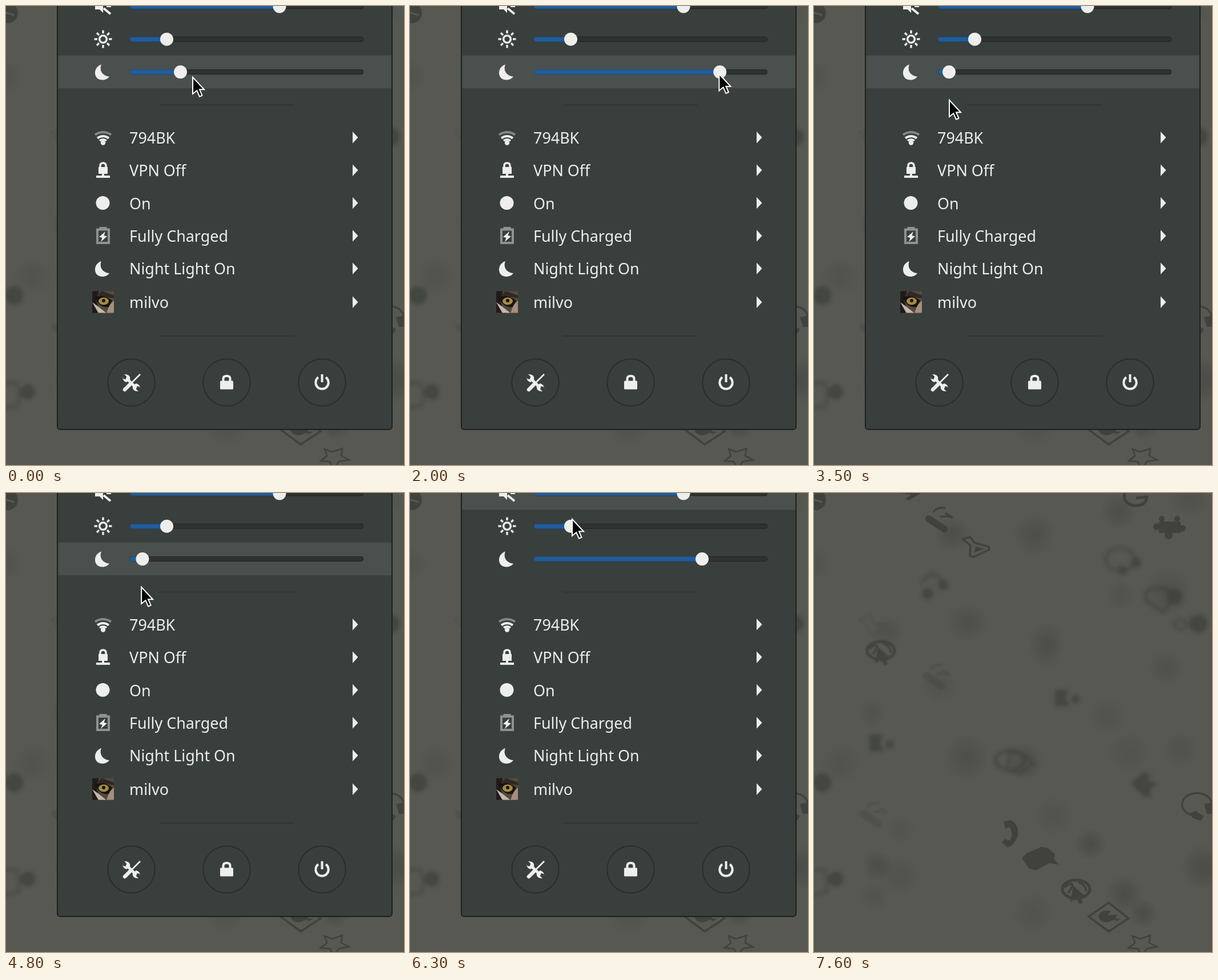
Write an HTML page that moves like this. It is 697x804 px and loops after 8.2 s.

```html
<!DOCTYPE html>
<html lang="en">
<head>
<meta charset="utf-8">
<title>System menu</title>
<style>
  html, body { margin: 0; width: 100%; height: 100%; overflow: hidden; background: #575851; }
  svg { display: block; width: 100%; height: 100%; }
  text { font: 26.9px "Noto Sans", "Open Sans", sans-serif; fill: #eeeeec; }
  .line { fill: none; stroke: #eeeeec; }
  .ink { fill: #3e3f3a; }
  .ring { fill: none; stroke: #3e3f3a; stroke-width: 5; }
  .thin { stroke-width: 3.5; }
</style>
</head>
<body>
<svg viewBox="0 0 697 804" preserveAspectRatio="none">
  <defs>
    <radialGradient id="soft">
      <stop offset="0" stop-color="#353634"/>
      <stop offset=".45" stop-color="#353634" stop-opacity=".65"/>
      <stop offset="1" stop-color="#353634" stop-opacity="0"/>
    </radialGradient>
    <filter id="b1" x="-30%" y="-30%" width="160%" height="160%"><feGaussianBlur stdDeviation="1.2"/></filter>
    <filter id="b3" x="-50%" y="-50%" width="200%" height="200%"><feGaussianBlur stdDeviation="3.2"/></filter>
    <clipPath id="avatar"><rect x="151" y="499.500" width="38" height="38"/></clipPath>
    <path id="moon" d="M167 102.500C152 107 152 129.500 169 129.500C174.500 129.500 178.500 127 181 123.500C170 123 162.500 113.500 167 102.500Z"/>
    <g id="brush">
      <path d="M-17-2L10 16" stroke="#3e3f3a" stroke-width="12" stroke-linecap="round"/>
      <path class="ring thin" d="M-9-13Q-4-23 12-21M3-5Q12-8 25-4L12-12"/>
    </g>
    <g id="globe">
      <ellipse class="ring" rx="24" ry="16"/>
      <path class="ring thin" d="M-20-3Q-8-14-6-6L-14 7M4-12Q16-10 18 4"/>
      <path class="ink" d="M-5-6L16 12L7 13L12 24L6 26L1 16L-10 22Z"/>
    </g>
    <g id="camera">
      <path class="ink" d="M-13-14H11L5 0L13 14H-13Z"/>
      <circle class="ink" cx="23" cy="2" r="7"/>
    </g>
  </defs>

  <rect width="697" height="804" fill="#575851"/>
  <g id="blobs" fill="url(#soft)"></g>

  <g filter="url(#b3)" opacity=".72">
    <ellipse class="ring" cx="536" cy="116" rx="25" ry="20" opacity=".7"/>
    <circle class="ink" cx="564" cy="122" r="9"/><circle class="ink" cx="540" cy="135" r="8"/>
    <path class="ring" d="M187 156L207 140L229 156" opacity=".7"/>
    <circle class="ink" cx="226" cy="161" r="9"/><circle class="ink" cx="199" cy="176" r="10"/>
    <path class="ring" d="M611 207Q574 190 581 174Q596 160 622 171Q627 200 611 207Z" opacity=".8"/>
    <circle class="ink" cx="631" cy="182" r="14"/>
    <ellipse class="ring" cx="642" cy="230" rx="11" ry="8" opacity=".7"/>
    <circle class="ink" cx="673" cy="229" r="16"/>
    <use href="#camera" x="435" y="359"/>
    <use href="#camera" x="110" y="438"/>
    <ellipse class="ring" cx="343" cy="468" rx="25" ry="17"/>
    <path class="ring" d="M343 454L368 458L384 474L362 490L338 486Z" opacity=".7"/>
    <path class="ink" d="M555 508L578 488L590 494L583 503L601 509L589 518L590 530L578 533Z"/>
    <circle class="ink" cx="14" cy="507" r="16"/><circle class="ink" cx="38" cy="676" r="13"/>
    <path class="ring" d="M-8 660H18Q28 682 20 700L-4 704" opacity=".6"/>
  </g>

  <g filter="url(#b1)">
    <use href="#globe" x="117" y="276" opacity=".8"/>
    <use href="#brush" x="103" y="564" opacity=".25"/>
    <use href="#brush" x="213" y="322" opacity=".25"/>
    <path class="ring" d="M82 222L97 212L106 230L124 232L105 250Z" opacity=".15"/>
  </g>
  <g opacity=".85">
    <circle class="ink" cx="3" cy="12" r="18"/>
    <path d="M-2 11L15 16" stroke="#575851" stroke-width="3"/>
    <path class="ink" d="M150 0H188L166 13L160 10L171 3Z"/>
    <path class="ring" d="M544 0Q540 18 560 22Q582 23 583 7L564 9"/>
    <use href="#brush" transform="translate(218 47)"/>
    <path class="ring thin" d="M261 81L273 77L281 87L306 94L307 99L280 112L273 110L274 92Z"/>
    <path class="ink" d="M281 104L283 94L298 98Z"/>
    <path class="ink" d="M604 50H642V70H604Z"/>
    <g class="ink"><circle cx="609" cy="45" r="5"/><circle cx="636" cy="45" r="5"/><circle cx="600" cy="59" r="6"/><circle cx="645" cy="62" r="6"/><circle cx="621" cy="74" r="7"/></g>
    <path class="ring thin" d="M664 565A26 20 0 1 1 693 556"/>
    <path class="ink" d="M683 545L697 542V562H688ZM657 562L668 557L683 566L678 574L664 570Z"/>
    <path class="ink" d="M332 576L343 573Q359 579 357 598Q354 614 339 621L329 612L334 606L343 609Q350 596 342 585L335 588Z"/>
    <path class="ink" d="M364 640L372 631L398 620L410 622L422 633L420 640L428 651L412 648L389 661L377 658Z"/>
    <use href="#globe" x="459" y="694"/>
    <path class="ring thin" d="M481 742L516 717.500L551 745L516 768Z"/>
    <path class="ink" d="M498 742Q500 729 520 732L514 740L531 738Q528 750 512 752Q500 751 498 742ZM520 744L538 746L530 750Z"/>
    <path class="ring" style="stroke-width:2.600" d="M558 776L571 781L589 775L587 788L601 795L583 798L574 810L567 798L551 797L562 788Z"/>
  </g>

  <g id="menu">
    <rect x="90" y="-40" width="586" height="781.800" rx="5" fill="#393f3d" stroke="#1d2020" stroke-width="2"/>
    <rect id="hover" x="91" width="584" height="57.400" fill="#4a504e"/>
    <g id="sliders"></g>
    <path d="M268 173.500H504M268 578H504" stroke="#313635" stroke-width="2"/>
    <g id="rows"></g>

    <g fill="#eeeeec">
      <path d="M156-6H164L170-12V12L164 6H156Z"/>
      <path class="line" stroke-width="4" d="M171 4L183 14M176 0H184"/>
      <circle class="line" cx="170" cy="58" r="6.300" stroke-width="3.600"/>
      <g id="rays" class="line" stroke-width="3.400"></g>
      <use href="#moon"/>
      <use href="#moon" y="344.500"/>

      <path class="line" stroke-width="4" d="M156 225.500Q170 216.500 184 225.500" opacity=".42"/>
      <path class="line" stroke-width="4" d="M160 231.500Q170 224.500 180 231.500"/>
      <path class="line" stroke-width="3.500" d="M164 236Q170 231.500 176 236"/>
      <circle cx="170" cy="239.500" r="4.200"/>

      <path class="line" stroke-width="3.500" d="M165 284V280Q165 275 170 275T175 280V284"/>
      <path d="M162 282H178V294H172V297H182V301H158V297H168V294H162Z"/>
      <circle cx="169.500" cy="345" r="12"/>

      <path d="M160 391.500H180V415H160Z" fill="none" stroke="#8f9291" stroke-width="4"/>
      <path d="M163.500 387H176.500V392H163.500Z" fill="#8f9291"/>
      <path d="M174 395L163 404.500L168.500 406L166 413L177 403.500L171.500 402Z"/>

      <g clip-path="url(#avatar)">
        <rect x="151" y="499" width="39" height="39" fill="#55493f"/>
        <path d="M151 499H163L158 516L166 538H151Z" fill="#201b19"/>
        <path d="M167 499L189 507V512L160 507Z" fill="#302923"/>
        <path d="M151 519L161 526L176 538H162Z" fill="#c4b7a8"/>
        <path d="M181 524L190 515V538H176Z" fill="#a58f7d"/>
        <path d="M155 510Q171 504 186 516L180 527Q164 530 155 510Z" fill="#181411"/>
        <ellipse cx="171" cy="517" rx="9" ry="6.500" fill="#a58a43"/>
        <circle cx="171" cy="516" r="3" fill="#17130c"/>
      </g>

      <g class="line">
        <path stroke-width="5" d="M211 652L228 669"/>
        <path stroke-width="2.600" d="M235 645L219 661"/>
        <path stroke-width="6.500" stroke-linecap="round" d="M217 663L208 672"/>
      </g>
      <path id="jaw" d="M207 645L211 649L210 654L205 653L204 649Q204 657 211 659L217 655Q219 645 207 645Z"/>
      <use href="#jaw" transform="rotate(180 219.500 660)"/>

      <rect x="375" y="656.500" width="23" height="15" rx="1.500"/>
      <path class="line" stroke-width="4" d="M380.500 658V653Q380.500 648 386.500 648T392.500 653V658"/>
      <path class="line" stroke-width="4" d="M547 650.500A11.200 11.200 0 1 0 560 650.500M553.500 645V659"/>
    </g>
    <g id="buttons" fill="none" stroke="#292e2c" stroke-width="2"></g>
  </g>

  <g id="cursor">
    <path d="M1 2.800V32L8.300 26L13 36.700L17.500 34.700L13 24.300H21Z" fill="#050505" stroke="#fff" stroke-width="2"/>
  </g>
</svg>

<script>
  const LOOP = 8200, STEP = 100, PITCH = 57.4;
  const LEAD = 35;                            // the knob runs ahead of the drawn pointer
  const GRAB = 200, DROP = 5600;
  const $ = id => document.getElementById(id);
  const clamp = (v, lo, hi) => Math.min(hi, Math.max(lo, v));
  const repeat = (n, draw) => Array.from({ length: n }, (_, i) => draw(i)).join("");

  let seed = 7;
  const random = () => (seed = seed * 16807 % 2147483647) / 2147483647;

  // faint smudges on a loose 5 x 6 grid
  $("blobs").innerHTML = repeat(30, i => {
    const x = (i % 5 + random()) * 140, y = (Math.floor(i / 5) + random()) * 134;
    return `<circle cx="${x}" cy="${y}" r="${26 + random() * 18}" opacity="${.1 + random() * .25}"/>`;
  });

  const slider = (row, x, id) => {
    const y = .8 + row * PITCH;
    return `<rect x="217.500" y="${y - 4}" width="408" height="8" rx="3" fill="#2e3332" stroke="#1e2221"/>
      <rect id="${id}Fill" x="217.500" y="${y - 4}" width="${x - 217}" height="8" rx="3" fill="#215d9c" stroke="#1d5087"/>
      <circle id="${id}Knob" cx="${x}" cy="${y}" r="11.500" fill="#eeeeec"/>`;
  };
  $("sliders").innerHTML = slider(0, 479, "volume") + slider(1, 281.5, "bright") + slider(2, 306, "night");

  const labels = ["794BK", "VPN Off", "On", "Fully Charged", "Night Light On", "milvo"];
  $("rows").innerHTML = labels.map((label, i) => {
    const y = 230.5 + i * PITCH + (i === 5 ? 1.5 : 0);
    return `<text x="216" y="${y + 10.3}">${label}</text>
      <path d="M607 ${y - 10.5}L616.500 ${y - .3}L607 ${y + 10}Z" fill="#eeeeec"/>`;
  }).join("");

  $("rays").innerHTML = repeat(8, i => `<path d="M170 42.500V48" transform="rotate(${i * 45} 170 58)"/>`);
  $("buttons").innerHTML = repeat(3, i => `<circle cx="${219.5 + i * 167}" cy="659.500" r="41.200"/>`);

  const linear = p => p;
  const quadOut = p => 1 - (1 - p) ** 2;
  const cubicOut = p => 1 - (1 - p) ** 3;
  const smooth = p => p * p * (3 - 2 * p);

  // pointer legs: start, end, x, y, ease
  const legs = [
    [100, 200, 305, 117, linear],
    [400, 1200, 362, 114.5, linear],
    [1200, 1700, 535, 115, quadOut],
    [1900, 2500, 567, 123, linear],
    [2600, 2800, 487, 135, linear],
    [2800, 3300, 236, 162, cubicOut],
    [4790, DROP, 511, 163, smooth],
    [6100, 6300, 283, 43, linear],
    [6400, 6700, 60, -45, linear]
  ];

  function pointer(t) {
    let x = 326, y = 122;
    for (const [from, to, toX, toY, ease] of legs) {
      const p = ease(clamp((t - from) / (to - from), 0, 1));
      x += (toX - x) * p;
      y += (toY - y) * p;
    }
    return [x, y];
  }

  function render(ms) {
    const t = Math.floor((ms % LOOP) / STEP) * STEP;
    const knob = pointer(clamp(t + LEAD, GRAB, DROP))[0] + .5;
    $("nightKnob").setAttribute("cx", knob);
    $("nightFill").setAttribute("width", knob - 217);
    $("cursor").setAttribute("transform", `translate(${pointer(t)})`);

    $("hover").setAttribute("y", t < 6300 ? 86.7 : -28.1);
    $("hover").setAttribute("opacity", t < 6800 ? 1 : 0);

    const closing = t >= 7500;
    $("menu").setAttribute("opacity", t >= 7600 ? 0 : closing ? .3 : 1);
    $("menu").setAttribute("transform", `translate(0 ${closing ? 13 : 0})`);
  }

  const start = performance.now();
  function tick() {
    render(performance.now() - start);
    requestAnimationFrame(tick);
  }
  tick();
</script>
</body>
</html>
```
